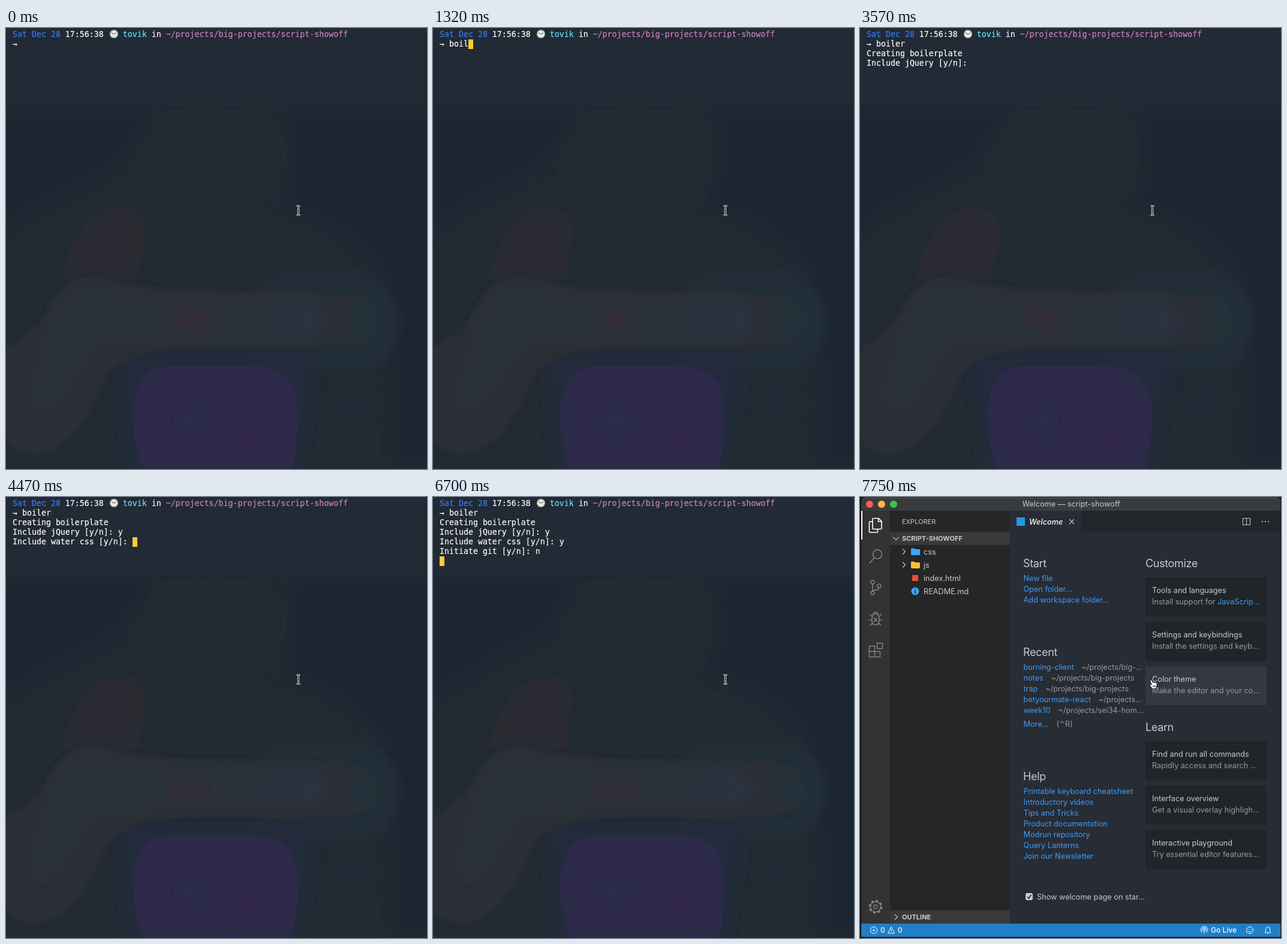
Write an HTML page that moves like this. It is 702 px wide and 735 px high and loops after 8000 ms.

```html
<!DOCTYPE html>
<html lang="en">
<head>
<meta charset="utf-8">
<title>Boilerplate script</title>
<style>
html, body { margin: 0; width: 100%; height: 100%; overflow: hidden; background: #222932; }
svg, pre { position: absolute; left: 0; top: 0; }
pre { left: 11px; top: 3px; margin: 0; color: #fbfbfb; -webkit-text-stroke: .2px;
  font: 13.288px/16px "DejaVu Sans Mono", monospace; }
pre i { display: inline-block; width: 8px; height: 16px; vertical-align: top; background: #ffcb2f; }
pre u { display: inline-block; width: 16px; text-decoration: none; }
.date { color: #3a78ee; } .user { color: #62e3f6; } .path { color: #cc80bf; }
#editor text { font: 12.7px Inter, sans-serif; fill: #c8cacc; white-space: pre; }
#editor .head { font-size: 18px; letter-spacing: -.02em; }
#editor .link, #editor .link tspan { fill: #409bf5; }
#editor .dim, #editor tspan.dim { fill: #97999d; }
#editor .cap { font-size: 11px; }
#editor .bold { font-size: 11px; font-weight: 700; }
#editor .tab { font-style: italic; font-weight: 500; fill: #fff; }
#editor .bar { font-size: 12px; font-weight: 500; fill: #fff; }
.line { fill: none; stroke: #858585; stroke-width: 1.4; }
</style>
</head>
<body>
<svg width="702" height="735" viewBox="0 0 702 735">
  <defs>
    <filter id="soft" x="-30%" y="-30%" width="160%" height="160%"><feGaussianBlur stdDeviation="10"/></filter>
    <filter id="edge"><feGaussianBlur stdDeviation="3"/></filter>
  </defs>
  <rect width="702" height="735" fill="#222a33"/>
  <g filter="url(#soft)">
    <path d="M-20 130H245Q225 215 150 255Q50 300-20 355Z" fill="#1f2631"/>
    <path d="M470 130H730V735H640V450Q590 330 450 300Q480 220 465 180Z" fill="#1f2731"/>
    <path d="M240 155Q360 135 455 165Q480 220 445 275Q300 300 210 280Z" fill="#242b33"/>
    <rect x="400" y="412" width="255" height="157" rx="74" fill="#222e39"/>
    <path d="M185 540H520L490 740H205Z" fill="#242b3b"/>
    <circle cx="575" cy="625" r="35" fill="#242c34"/>
  </g>
  <rect y="-5" width="702" height="133" fill="#242c34" filter="url(#edge)"/>
  <g filter="url(#edge)">
    <path d="M92 420Q115 315 180 300Q232 298 234 340L220 420Z" fill="#292b31"/>
    <path d="M70 470Q100 408 155 414Q205 435 300 437L555 443Q618 448 618 488Q615 530 555 532L300 534Q170 540 160 600Q110 710 45 711Q-10 705-10 650V540Q45 510 70 470Z" fill="#292d34"/>
  </g>
  <g filter="url(#soft)">
    <path d="M75 480Q100 425 150 430L300 450H520V520H300L150 530L90 620Q50 650 35 620Z" fill="#2b303a"/>
    <ellipse cx="305" cy="486" rx="42" ry="17" fill="#302e37"/>
    <ellipse cx="485" cy="487" rx="55" ry="25" fill="#2a3341"/>
    <ellipse cx="595" cy="487" rx="22" ry="32" fill="#24313b"/>
  </g>
  <path d="M228 735Q212 690 212 640Q216 564 270 563H415Q478 566 485 622Q489 690 476 735Z" fill="#2c2a48"/>
  <g filter="url(#soft)">
    <circle cx="408" cy="682" r="25" fill="#33284c"/>
    <circle cx="305" cy="655" r="14" fill="#2e2b4d"/>
  </g>
</svg>
<pre><span class="date">Sat Dec 28</span> 17:56:38 <u> </u> <span class="user">tovik</span> in <span class="path">~/projects/big-projects/script-showoff</span>
→ <span id="typed"></span><i id="caret"></i></pre>
<svg width="702" height="735" viewBox="0 0 702 735">
  <circle cx="180" cy="10" r="7.3" fill="#8d8d8d"/>
  <circle cx="180" cy="10" r="6" fill="#ecebe7"/>
  <path d="M175.500 7.500L180 10.500L184 8" fill="none" stroke="#4c4c4c"/>
  <g id="editor"></g>
  <path id="beam" d="M484.500 296.500Q487.500 296.500 487.500 299V309Q487.500 311.500 484.500 311.500M490.500 296.500Q487.500 296.500 487.500 299M487.500 309Q487.500 311.500 490.500 311.500M485.500 304.500H489.500" fill="none"/>
  <path id="hand" d="M484.300 305.700Q485.800 304.300 487 306L488.700 309.500Q489.700 308 491 309.300Q492 308.200 493 309.600Q495 309 495.200 311.500L495 315L493.600 319.500H487.500L484 315Q482.600 312.800 484.400 312.200L486.500 313.300L484.200 307.500Q483.700 306.500 484.300 305.700ZM488.900 314V317M490.900 314V317M492.900 314V317" fill="#fff" stroke="#101216" stroke-width=".9"/>
</svg>
<script>
const $ = id => document.getElementById(id);

// [start in ms, text added, caret visible]
const steps = [
  [0, '', 0], [140, '', 1], [740, 'b', 1], [880, 'o', 1], [1030, 'i', 1],
  [1320, 'l', 1], [1470, 'e', 1], [1620, 'r', 1],
  [2220, '\nCreating boilerplate\n', 1], [2820, '', 0],
  [2970, 'Include jQuery [y/n]: ', 1], [3570, '', 0], [4170, '', 1], [4320, 'y\n', 1],
  [4470, 'Include water css [y/n]: ', 1], [5070, '', 0], [5660, 'y', 1],
  [5810, '\nInitiate git [y/n]: ', 1], [6410, '', 0], [6700, 'n\n', 1], [7300, '', 0]
];
const LOOP = 8000, HAND = 7600, EDITOR = 7750;

const text = (x, y, s, cls = '') => `<text x="${x}" y="${y}" class="${cls}">${s}</text>`;
const rect = (x, y, w, h, fill, rx = 0) =>
  `<rect x="${x}" y="${y}" width="${w}" height="${h}" rx="${rx}" fill="${fill}"/>`;
const dot = (x, y, r, fill) => `<circle cx="${x}" cy="${y}" r="${r}" fill="${fill}"/>`;
const line = (d, color = '#858585', w = 1.4) =>
  `<path class="line" d="${d}" style="stroke:${color};stroke-width:${w}"/>`;
const ring = (x, y, r) => `M${x - r} ${y}a${r} ${r} 0 1 0 ${2 * r} 0a${r} ${r} 0 1 0 ${-2 * r} 0`;
const list = (x, y, items, cls) => items.map((s, i) => text(x, y + 18 * i, s, cls)).join('');
const right = (x, y) => line(`M${x - 2} ${y - 4.5}l4.500 4.500l-4.500 4.500`, '#c5c5c5', 1.1);
const folder = (y, fill) =>
  `<path d="M85 ${y - 4}q0-1.500 1.500-1.500h4l1.500 1.500h6.500q1.500 0 1.500 1.500v7q0 1.500-1.500 1.500h-12q-1.500 0-1.500-1.500z" fill="${fill}"/>`;
const recent = (name, path) => `${name}<tspan dx="13" class="dim">${path}</tspan>`;
const card = (y, title, info, fill = '#212429') =>
  rect(476, y, 202, 65, fill) + text(487, y + 26, title) + text(487, y + 45, info, 'dim');

const frame = rect(0, 0, 702, 735, '#111214') + rect(2, 1, 699, 733, '#282c34', 5) +
  rect(2, 1, 699, 22, '#3a3b3d', 5) + rect(6, 1, 691, 1, '#626365') +
  rect(2, 23, 48, 688, '#333334') + rect(50, 23, 200, 688, '#242627') +
  rect(250, 23, 451, 35, '#22252a') + rect(250, 23, 119, 35, '#282c34') +
  rect(50, 58, 200, 22, '#38393a') + rect(50, 689, 200, 22, '#38393a') +
  rect(2, 711, 699, 22, '#217fc7') + rect(2, 23, 2, 48, '#fff') +
  ['#fc5b57', '#fdbc40', '#34c84a'].map((c, i) => dot(16 + 20 * i, 12, 6, c)).join('') +
  `<g text-anchor="middle">${text(352, 16, 'Welcome — script-showoff')}</g>`;

const activity =
  line('M21 41V36.500Q21 35.500 22 35.500H31L36 40.500V52.500Q36 53.500 35 53.500H30M30.500 36V41H36M21 41H16.500Q15.500 41 15.500 42V58Q15.500 59 16.500 59H28.500Q29.500 59 29.500 58V53.500H22Q21 53.500 21 52.500Z', '#fff', 1.6) +
  line(ring(29, 95.5, 7.5) + 'M24 101.500L15.500 110.500', undefined, 1.6) +
  line(ring(21, 142, 3) + ring(21, 160, 3) + ring(32, 148, 3) + 'M21 145V157M32 151Q31 155 26 155Q22 155 21 157') +
  line('M20 202Q20 195 26 195T32 202V206Q32 213 26 213T20 206ZM22 196Q22 192 26 192T30 196M20 199L16 195M32 199L36 195M20 205H15M32 205H37M21 210L17 214M31 210L35 214M23 201L29 208M29 201L23 208') +
  line('M15.500 248.500H24.500V257.500H33.500V266.500H15.500ZM15.500 257.500H24.500V266.500M28.500 243.500H37.500V252.500H28.500Z') +
  line(ring(26, 683, 3.2) + ring(26, 683, 8.5)) +
  `<circle class="line" cx="26" cy="683" r="10" style="stroke-width:3;stroke-dasharray:3.927"/>`;

const sidebar = text(70, 45, 'EXPLORER', 'cap') + text(70, 73, 'SCRIPT-SHOWOFF', 'bold') +
  line('M55.500 67l4.500 4.500l4.500-4.500', '#c5c5c5', 1.1) +
  right(73, 91) + right(73, 113) + right(60, 700) +
  folder(91, '#42a5f5') + folder(113, '#fbc02d') +
  rect(87, 130, 10, 10, '#e5532b') + dot(92, 157, 6.5, '#42a5f5') +
  rect(91.2, 156, 1.6, 5, '#242627') + rect(91.2, 153, 1.6, 1.7, '#242627') +
  ['css', 'js', 'index.html', 'README.md'].map((s, i) => text(106, 96 + 22 * i, s)).join('') +
  text(70, 704, 'OUTLINE', 'bold');

const tabs = rect(261, 34, 14, 14, '#2497e3') + text(282, 46, 'Welcome', 'tab') +
  line('M349 37l8 8m0-8l-8 8', '#c5c5c5', 1.1) +
  line('M638.500 35.500h12v11h-12zM644.500 35.500v11', '#c5c5c5', 1.1) +
  [671, 676, 681].map(x => dot(x, 41, 1.1, '#c5c5c5')).join('');

const welcome =
  text(272, 117, 'Start', 'head') + text(476, 117, 'Customize', 'head') +
  text(272, 265, 'Recent', 'head') + text(272, 472, 'Help', 'head') + text(476, 390, 'Learn', 'head') +
  list(272.5, 140, ['New file', 'Open folder...', 'Add workspace folder...'], 'link') +
  list(272.5, 288, [
    recent('burning-client', '~/projects/big-...'),
    recent('notes', '~/projects/big-projects'),
    recent('trap', '~/projects/big-projects'),
    recent('betyourmate-react', '~/projects...'),
    recent('week10', '~/projects/sei34-hom...')
  ], 'link') +
  text(272.5, 383, recent('More...', '(⌃R)'), 'link') +
  list(272.5, 495, ['Printable keyboard cheatsheet', 'Introductory videos', 'Tips and Tricks',
    'Product documentation', 'Modrun repository', 'Query Lanterns', 'Join our Newsletter'], 'link') +
  card(134, 'Tools and languages', 'Install support for <tspan style="fill:#409bf5">JavaScrip...</tspan>') +
  card(208, 'Settings and keybindings', 'Install the settings and keyb...') +
  card(282, 'Color theme', 'Make the editor and your co...', '#353841') +
  card(407, 'Find and run all commands', 'Rapidly access and search ...') +
  card(481, 'Interface overview', 'Get a visual overlay highligh...') +
  card(555, 'Interactive playground', 'Try essential editor features...') +
  rect(276, 660, 12, 12, '#c9cacc', 3) + line('M279 666l2.500 3l4-6', '#24272c', 1.6) +
  text(295, 671, 'Show welcome page on star...');

const status = line(
  ring(23, 722, 5.5) + 'M21 720l4 4m0-4l-4 4M52 716.500L57.500 727H46.500ZM52 720v3.500M52 724.500v1' +
  ring(574, 721, 1.5) + 'M574 722.500v5.500M571.500 724Q569.500 721 571.500 718.500Q574 716.500 576.500 718.500Q578.500 721 576.500 724M570 726Q566.500 721 570 717Q574 714 578 717Q581.500 721 578 726' +
  ring(650, 722, 5.5) + 'M647.500 723.500q2.500 3 5 0M648 720v1M652 720v1M675 726H685L683.500 724V720Q683.500 716.500 680 716.500T676.500 720V724ZM679 727.500h2', '#fff', 1) +
  text(34, 726, '0', 'bar') + text(63, 726, '0', 'bar') + text(585, 726, 'Go Live', 'bar');

$('editor').innerHTML = frame + activity + sidebar + tabs + welcome + status;
$('beam').insertAdjacentHTML('beforebegin', $('beam').outerHTML.replace('id="beam"', 'class="beam" stroke="#fff" stroke-width="2.6"'));
$('beam').setAttribute('class', 'beam');
$('beam').setAttribute('stroke', '#111');
const beams = document.querySelectorAll('.beam');
const show = (el, on) => { el.style.display = on ? '' : 'none'; };

function draw(now) {
  const t = now % LOOP;
  const past = steps.filter(s => s[0] <= t);
  $('typed').textContent = past.map(s => s[1]).join('');
  $('caret').style.visibility = past[past.length - 1][2] ? 'visible' : 'hidden';
  show($('editor'), t >= EDITOR);
  show($('hand'), t >= HAND);
  beams.forEach(b => show(b, t < HAND));
  requestAnimationFrame(draw);
}
draw(performance.now());
</script>
</body>
</html>
```
